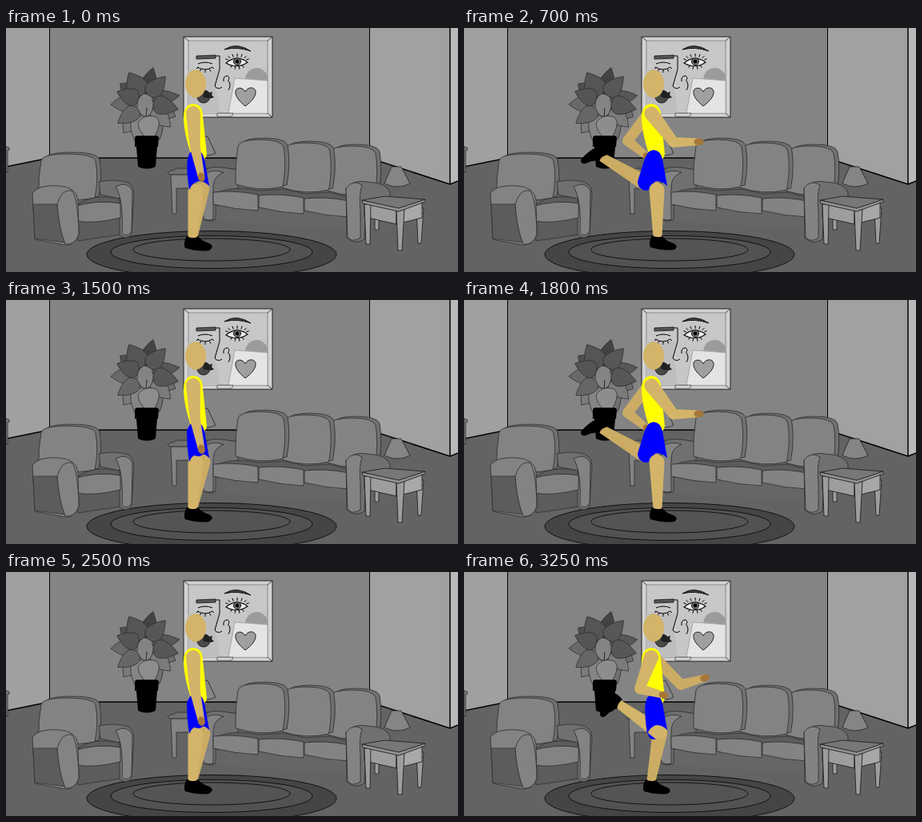
Animation of 565x306 px, one loop 3.3 s. Source, as an HTML page:

```html
<!DOCTYPE html>
<html lang="en">
<head>
<meta charset="utf-8">
<title>Heel kicks</title>
<style>
html, body { margin: 0; width: 100%; height: 100%; overflow: hidden; background: #636363; }
svg { display: block; width: 100%; height: 100%; }
.line { fill: none; stroke: #000; }
.soft { fill: #838383; stroke: #2b2b2b; stroke-width: .8; }
.mid { fill: #707070; stroke: #2b2b2b; stroke-width: .8; }
.dark { fill: #5c5c5c; stroke: #333; stroke-width: .8; }
.skin { fill: #d3b468; }
.far { fill: #ccac64; }
.blue { fill: #00f; }
.shirt { fill: #ff0; }
.hand { fill: #a5763a; }
</style>
</head>
<body>
<svg viewBox="0 0 565 306" preserveAspectRatio="none">
  <!-- room -->
  <rect width="565" height="306" fill="#636363"/>
  <rect x="54" width="400" height="163" fill="#848484"/>
  <path d="M0 0H54V163L0 174Z" fill="#a0a0a0"/>
  <path d="M454 0H555V196L454 163Z" fill="#a1a1a1"/>
  <path d="M555 0H565V192L555 196Z" fill="#b9b9b9"/>
  <path class="line" d="M0 174L54 163H454L555 196L565 192" stroke-width="1.5"/>
  <path class="line" d="M54.5 0V163M454.5 0V163"/>
  <path class="line" d="M555 0V196" stroke-width="1.5"/>
  <path d="M0 149L4 150V153H2V181H0Z" fill="#888" stroke="#222" stroke-width=".8"/>

  <!-- rug -->
  <g stroke="#111">
    <ellipse cx="257" cy="284" rx="156" ry="29.5" fill="#454545"/>
    <ellipse cx="257" cy="281" rx="126" ry="20.5" fill="#525252"/>
    <ellipse cx="257" cy="278" rx="98" ry="14" fill="#545454"/>
  </g>

  <!-- picture -->
  <path d="M222 11H333V112H222Z" fill="#d2d2d2" stroke="#222"/>
  <path d="M228 16H327V107H228Z" fill="#c7c7c7" stroke="#777" stroke-width=".8"/>
  <path class="line" d="M222 11L228 16M333 11L327 16M222 112L228 107M333 112L327 107" stroke-width=".7"/>
  <path d="M228 52H267L262 74L268 107H228Z" fill="#bebebe"/>
  <path d="M299 63A14.5 15 0 0 1 327 60V66Z" fill="#9b9b9b"/>
  <path d="M286 63L327 66V107H278Z" fill="#e4e4e4" stroke="#888" stroke-width=".6"/>
  <path d="M299 98C292 92 286 86 287 79C289 73 297 75 299 80C302 74 310 73 312 79C313 86 306 93 299 98Z" fill="#a0a0a0" stroke="#222"/>
  <path d="M238 35L262 34V38L238 39Z" fill="#555" stroke="#111" stroke-width=".8"/>
  <path class="line" d="M262 35H267V52L261 73Q265 78 270 74M272 67Q271 60 277 60Q281 63 277 66M278 66Q282 72 278 78M239 49Q249 55 258 49M240 45Q249 41 258 45"/>
  <path d="M273 27Q288 17 306 29Q289 23 273 27Z" fill="#444" stroke="#111"/>
  <path d="M275 44Q288 33 302 43Q289 52 275 44Z" fill="#eee" stroke="#111" stroke-width="1.2"/>
  <circle cx="289" cy="42" r="4.5" fill="#777" stroke="#111"/>
  <circle cx="289" cy="42" r="2.4"/>
  <path class="line" id="lashes"/>
  <circle cx="247" cy="86" r="8" fill="#494949" stroke="#222"/>
  <path d="M247 79Q252 77 254 81L258 80L257 84L260 87Q252 90 246 86Z" fill="#222"/>
  <path d="M264 107H284L282 111H264Z" fill="#d9d9d9" stroke="#333" stroke-width=".7"/>

  <!-- plant -->
  <g id="plant" stroke="#2a2a2a" stroke-width=".7"></g>
  <path d="M161 138Q161 135 165 135H187Q191 135 191 138L190 149H189L187 174Q176 179 165 174L163 149H161Z"/>

  <!-- back table and lamp -->
  <path d="M246 136H252L262 157Q253 162 243 158Z" fill="#858585" stroke="#222" stroke-width=".8"/>
  <path class="mid" d="M202 181L214 176H262V184H204Z"/>
  <path class="soft" d="M206 184H260V201H213V233H208Z"/>

  <!-- sofa -->
  <path fill="#666" d="M262 224L428 232V253L262 242Z"/>
  <path class="mid" d="M245 182Q252 172 272 175L290 178V206H262V240Q251 245 245 238Z"/>
  <path class="soft" d="M247 184Q257 176 272 181Q259 186 259 200V240Q247 243 246 235Z"/>
  <g id="backs"></g>
  <path class="dark" d="M262 207Q284 197 316 204L348 202L374 208L404 206L429 212V222H262Z"/>
  <g id="seats"></g>
  <path class="mid" d="M425 201Q433 190 452 193Q477 194 480 207V221H450L448 265Q436 273 426 263Z"/>
  <path class="soft" d="M425 201Q434 189 445 197Q441 207 443 230V263Q433 270 427 262Z"/>

  <!-- front lamp and table -->
  <path d="M482 174H494L505 195Q489 203 473 195Z" fill="#858585" stroke="#222" stroke-width=".8"/>
  <g fill="#9d9d9d" stroke="#222" stroke-width=".9">
    <path d="M461 225H466V253H461ZM513 226H522L519 270H515Z"/>
    <path d="M448 220L488 228V246L448 237Z"/>
    <path d="M488 228L520 219V238L488 246Z" fill="#a8a8a8"/>
    <path d="M448 221H456L455 271H450ZM488 228H498L495 279H490Z"/>
    <path d="M445 216L473 211L524 215L491 227Z" fill="#777"/>
    <path d="M445 216L491 226L524 215V218L491 230L446 220Z" fill="#929292"/>
  </g>

  <!-- armchair -->
  <g id="chair"></g>
  <path class="dark" d="M88 235L144 231V259L90 267Z" stroke="none"/>
  <path class="mid" d="M116 193Q132 189 150 193Q160 197 160 209L157 259Q149 267 142 259V214L118 209Z"/>
  <path class="soft" d="M137 199Q151 191 158 204L157 255Q150 264 145 257Q147 215 137 199Z"/>
  <path class="dark" d="M90 221Q110 207 142 214V222H90Z"/>
  <path class="soft" d="M85 224Q115 215 143 220V238Q110 246 88 242Z"/>
  <path class="soft" d="M33 207Q41 196 66 198Q88 199 90 216L91 259Q86 273 73 272L36 265Z"/>
  <path class="dark" d="M34 221H64Q66 246 73 269L36 264Z"/>
  <path class="soft" d="M64 221Q70 201 82 204Q90 211 91 259Q86 273 74 271Q66 251 64 221Z"/>

  <g id="man"></g>
</svg>
<script>
const $ = id => document.getElementById(id);
const rad = deg => deg * Math.PI / 180;
const path = (cls, d, extra = '') => `<path class="${cls}" d="${d}" ${extra}/>`;

let seed = 7;
const random = () => (seed = seed * 16807 % 2147483647) / 2147483647;

// Lashes fan out from an eye
function fan(x, y, rx, ry, from, to, count) {
  let d = '';
  for (let i = 0; i < count; i++) {
    const a = rad(from + (to - from) * i / (count - 1)), c = Math.cos(a), s = Math.sin(a);
    d += `M${x + rx * c} ${y + ry * s}L${x + rx * 1.3 * c} ${y + (ry + 4) * s}`;
  }
  return d;
}
$('lashes').setAttribute('d', fan(289, 42, 12, 6, 200, 340, 7) + fan(289, 43, 10, 5, 50, 130, 4) + fan(249, 48, 9, 4, 20, 160, 5));

// Leaves spread by the golden angle; upper ones are darker
function plant() {
  let out = path('line', 'M172 137Q175 118 176 100M178 137Q180 118 187 102M169 137Q165 118 160 105');
  for (let i = 0; i < 16; i++) {
    const turn = i * 137.5 + 90, c = Math.cos(rad(turn)), s = Math.sin(rad(turn));
    const len = 28 + random() * 8, w = 16 + random() * 9, g = 85 + s * 30 + random() * 30;
    out += path('', `M0 0C0 ${-w} ${len * .6} ${-w * .6} ${len} 0C${len * .7} ${w * .4} ${len * .1} ${w} 0 0`,
      `transform="translate(${174 + c * 10} ${97 + s * 14}) rotate(${turn + 20 * c})" fill="rgb(${g},${g},${g})"`);
  }
  return out;
}
$('plant').innerHTML = plant();

function cushion(x, y, w, h) {
  const d = `M3 8Q5 0 ${w / 2} 0Q${w - 4} 0 ${w - 1} 9Q${w + 3} ${h / 2} ${w - 2} ${h - 5}Q${w / 2} ${h + 2} 0 ${h - 8}Q-1 ${h / 2} 3 8Z`;
  return path('mid', d, `transform="translate(${x + 5} ${y - 2})"`) + path('soft', d, `transform="translate(${x} ${y})"`);
}
$('chair').innerHTML = cushion(41, 158, 72, 60);

let backs = '', seats = '';
for (let i = 0; i < 3; i++) {
  const x = 259 + i * 57, y = 206 + i * 4;
  backs = cushion(287 + i * 57.5, 140 + i * 4, 61, 64) + backs;
  seats += path('soft', `M${x} ${y}Q${x + 28} ${y - 3} ${x + 56} ${y + 3}V${y + 23}Q${x + 28} ${y + 22} ${x} ${y + 15}Z`);
}
$('backs').innerHTML = backs;
$('seats').innerHTML = seats;

// Rounded limb tapering from radius r to radius s
function taper(cls, [x, y], r, [u, v], s) {
  const a = Math.atan2(v - y, u - x), nx = -Math.sin(a), ny = Math.cos(a);
  const p = (x, y, k) => `${(x + nx * k).toFixed(1)} ${(y + ny * k).toFixed(1)}`;
  return path(cls, `M${p(x, y, r)}A${r} ${r} 0 0 1 ${p(x, y, -r)}L${p(u, v, -s)}A${s} ${s} 0 0 1 ${p(u, v, s)}Z`);
}

const blend = (a, b, k) => a + (b - a) * k;
const mix = (a, b, k) => a.map((n, i) => blend(n, b[i], k));
// Point at a distance, with the angle measured forward from straight down
const reach = ([x, y], deg, len) => [x + Math.sin(rad(deg)) * len, y + Math.cos(rad(deg)) * len];

// upper and lower arm angles at the top of a kick, per side
const arms = [
  { near: [-20, 75], far: [44, 106] },
  { near: [40, 99], far: [-40, 55] }
];

function arm(cls, shoulder, r, [upper, lower], lift) {
  const elbow = reach(shoulder, blend(3, upper, lift), 42 + Math.max(0, upper) * .1 * lift);
  const turn = blend(12, lower, lift ** 1.5);
  const hand = reach(elbow, turn, 39 - 8 * lift);
  return taper(cls, shoulder, r, elbow, 6.5) + taper(cls, elbow, 6.5, hand, 4.2) +
    `<ellipse class="hand" rx="6" ry="4.3" transform="translate(${hand}) rotate(${90 - turn})"/>`;
}

function leg(cls, knee, ankle, turn) {
  return taper(cls, knee, 9.5, ankle, 5.5) +
    path('', 'M-7 -2Q-12 8 -9 13Q8 18 21 16Q27 12 20 8Q10 5 6 -1Q0 2 -7 -2Z',
      `transform="translate(${ankle}) rotate(${turn})"`);
}

function kick(cls, knee, turn, start, k, flex) {
  const [x, y] = reach(knee, -turn, 58 + 4 * k);
  return leg(cls, knee, [x + start * (1 - k), y], turn * flex);
}

function draw(time) {
  const now = Math.floor(time % 3300 / 50) * 50;
  const side = Math.floor(now / 500) % 2;
  const lift = Math.sin(Math.PI * (now % 500) / 500) ** 1.3;
  const k = Math.min(1, 2 * lift);
  let nearLeg, farLeg, thigh;

  if (side) {
    const knee = mix([246, 203], [226, 194], k);
    farLeg = kick('far', knee, 129 * lift, -12, k, 1.14);
    thigh = taper('blue', [237, 166], 11, mix([240, 186], [227, 194], k), 10);
    nearLeg = leg('skin', mix([237, 205], [241, 203], k), mix([233, 262], [242, 262], k), 0);
  } else {
    const knee = mix([237, 205], [244, 201], k);
    farLeg = leg('far', [245, 201], [234, 262], 0);
    thigh = taper('blue', [238, 175], 9, [237, 184 + 19 * k], 7);
    nearLeg = kick('skin', knee, 125 * lift, -4, k, .92);
  }

  $('man').innerHTML =
    arm('far', mix([236, 106], side ? [230, 108] : [239, 108], k), 7, arms[side].far, lift) +
    farLeg + thigh + nearLeg +
    path('shirt', 'M222 112Q222 96 234 95Q246 96 246 110L251 158Q250 164 246 166L231 158Q222 130 222 112Z') +
    path('blue', 'M229 203Q225 176 227 164Q229 153 237 153Q245 153 248 164L254 198Q247 191 240 192Q232 195 229 203Z') +
    arm('skin', [234, 107], 9, arms[side].near, lift) +
    '<ellipse class="skin" cx="237" cy="70" rx="13" ry="17.5"/>';
}

const begin = performance.now();
function tick() {
  draw(performance.now() - begin);
  requestAnimationFrame(tick);
}
tick();
</script>
</body>
</html>
```
